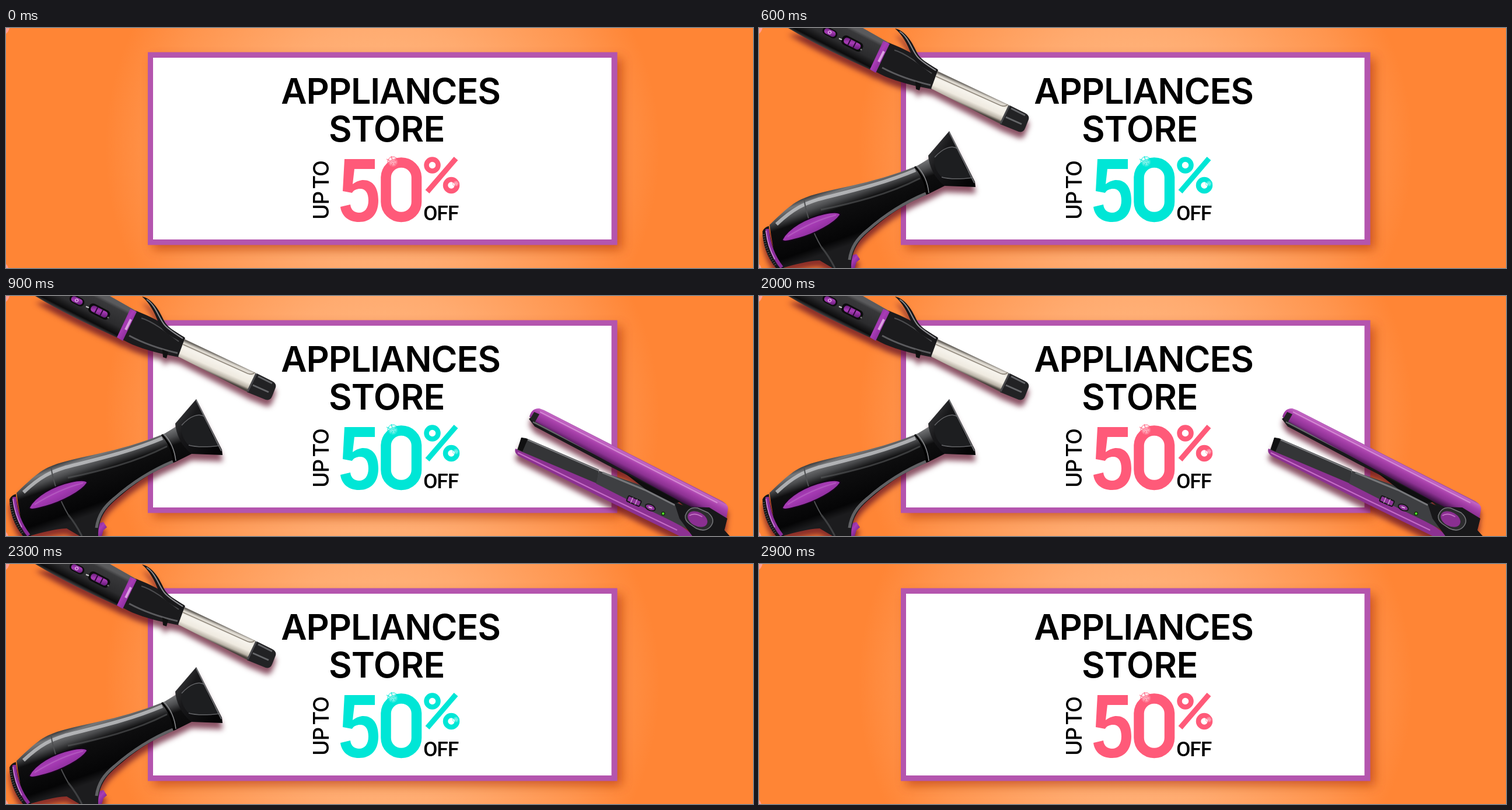
Write an HTML page that moves like this. It is 1280 by 412 pixels and loops after 3200 ms.

```html
<!DOCTYPE html>
<html lang="en">
<head>
<meta charset="utf-8">
<title>Appliances store</title>
<style>
html, body { margin: 0; width: 100%; height: 100%; overflow: hidden; background: #ff8535; }
svg { display: block; width: 100vw; height: 100vh; }
.title { font: 600 61px Inter, sans-serif; text-anchor: middle; }
.upto { font: 500 36.5px Inter, sans-serif; letter-spacing: -1.2px; word-spacing: -4px; }
.off { font: 500 35.5px Roboto, sans-serif; letter-spacing: -1.2px; }
.tool { opacity: 0; filter: drop-shadow(0 11px 5px rgba(90, 10, 35, .7)); }
.tool, .deal { animation: 3.2s step-end infinite; }
.iron { animation-name: iron; }
.dryer { animation-name: dryer; }
.straightener { animation-name: straightener; }
.trimmer { animation-name: trimmer; }
.deal { color: #ff5a79; animation-name: deal; }
@keyframes iron { 0%, 90.625%, 100% { opacity: 0 } 9.375% { opacity: 1 } }
@keyframes dryer { 0%, 81.25%, 100% { opacity: 0 } 18.75% { opacity: 1 } }
@keyframes straightener { 0%, 71.875%, 100% { opacity: 0 } 28.125% { opacity: 1 } }
@keyframes trimmer { 0%, 62.5%, 100% { opacity: 0 } 37.5% { opacity: 1 } }
@keyframes deal {
  0%, 37.5%, 90.625%, 100% { color: #ff5a79 }
  18.75%, 71.875% { color: #00e6d6 }
}
</style>
</head>
<body>
<svg viewBox="0 0 1280 412" preserveAspectRatio="none">
  <defs>
    <radialGradient id="glow" gradientUnits="userSpaceOnUse" cx="645" cy="206" r="475">
      <stop offset="0" stop-color="#ffc08c"/>
      <stop offset=".45" stop-color="#ffab70"/>
      <stop offset=".8" stop-color="#ff954e"/>
      <stop offset="1" stop-color="#ff8535"/>
    </radialGradient>
    <filter id="soft" x="-10%" y="-10%" width="120%" height="130%"><feGaussianBlur stdDeviation="9"/></filter>
    <radialGradient id="flare">
      <stop offset="0" stop-color="#fff"/>
      <stop offset=".3" stop-color="#fff" stop-opacity=".6"/>
      <stop offset="1" stop-color="#fff" stop-opacity="0"/>
    </radialGradient>
    <linearGradient id="grip" gradientUnits="userSpaceOnUse" x1="160" y1="0" x2="134" y2="51">
      <stop offset="0" stop-color="#5a5a5c"/>
      <stop offset=".1" stop-color="#38383a"/>
      <stop offset=".55" stop-color="#2b2b2d"/>
      <stop offset=".8" stop-color="#0b0b0c"/>
      <stop offset=".92" stop-color="#48484a"/>
      <stop offset="1" stop-color="#111"/>
    </linearGradient>
    <linearGradient id="barrel" gradientUnits="userSpaceOnUse" x1="367" y1="103" x2="353" y2="135">
      <stop offset="0" stop-color="#6d6963"/>
      <stop offset=".12" stop-color="#d9d4cb"/>
      <stop offset=".32" stop-color="#f6f3ec"/>
      <stop offset=".65" stop-color="#efeae0"/>
      <stop offset=".88" stop-color="#b9b2a6"/>
      <stop offset="1" stop-color="#4b453f"/>
    </linearGradient>
    <linearGradient id="violet" x1="0" y1="0" x2="1" y2="1">
      <stop offset="0" stop-color="#641a76"/>
      <stop offset=".45" stop-color="#a83cb6"/>
      <stop offset="1" stop-color="#5d1670"/>
    </linearGradient>
    <linearGradient id="shell" gradientUnits="userSpaceOnUse" x1="150" y1="266" x2="184" y2="362">
      <stop offset="0" stop-color="#3a3b3d"/>
      <stop offset=".08" stop-color="#77787a"/>
      <stop offset=".22" stop-color="#4b4c4e"/>
      <stop offset=".36" stop-color="#0e0e0f"/>
      <stop offset=".85" stop-color="#050506"/>
      <stop offset="1" stop-color="#1c1c1e"/>
    </linearGradient>
    <linearGradient id="nozzle" x1="0" y1="0" x2="1" y2=".7">
      <stop offset="0" stop-color="#48494b"/>
      <stop offset=".4" stop-color="#18181a"/>
      <stop offset="1" stop-color="#050506"/>
    </linearGradient>
    <linearGradient id="arm" gradientUnits="userSpaceOnUse" x1="1076" y1="271" x2="1060" y2="302">
      <stop offset="0" stop-color="#64206c"/>
      <stop offset=".15" stop-color="#c366c4"/>
      <stop offset=".4" stop-color="#a941ac"/>
      <stop offset=".7" stop-color="#8c3192"/>
      <stop offset="1" stop-color="#3f1246"/>
    </linearGradient>
    <linearGradient id="chrome" gradientUnits="userSpaceOnUse" x1="1073" y1="46" x2="1157" y2="104">
      <stop offset="0" stop-color="#0c0c0d"/>
      <stop offset=".08" stop-color="#747577"/>
      <stop offset=".15" stop-color="#121213"/>
      <stop offset=".3" stop-color="#2e2f30"/>
      <stop offset=".58" stop-color="#4e4f51"/>
      <stop offset=".67" stop-color="#d0d1d2"/>
      <stop offset=".74" stop-color="#1d1d1e"/>
      <stop offset=".84" stop-color="#a5a6a8"/>
      <stop offset=".92" stop-color="#4a4b4c"/>
      <stop offset="1" stop-color="#0c0c0d"/>
    </linearGradient>
    <linearGradient id="frame" gradientUnits="userSpaceOnUse" x1="1090" y1="50" x2="1145" y2="80">
      <stop offset="0" stop-color="#8c8d8f"/>
      <stop offset=".5" stop-color="#f1f1f2"/>
      <stop offset="1" stop-color="#a9aaac"/>
    </linearGradient>
    <g id="sparkle">
      <circle r="9" fill="url(#flare)"/>
      <path d="M-11-5 0-1 8-5 1 0 9 7 0 1-4 11-1 1ZM-3-10 1-1-1 0Z" fill="#fff" opacity=".75"/>
    </g>
  </defs>

  <rect width="1280" height="412" fill="#ff8535"/>
  <rect width="1280" height="412" fill="url(#glow)"/>
  <path d="M0 0H6Q4 7 0 10Z" fill="#ff9d91"/>
  <path d="M0 405Q3 408 4 412H0Z" fill="#ff9d91"/>

  <rect x="252" y="52" width="803" height="328" fill="#b83c0c" opacity=".7" filter="url(#soft)"/>
  <rect x="243" y="41.500" width="804.500" height="331" fill="#b455ae"/>
  <rect x="252" y="51" width="785.500" height="312" fill="#fff"/>

  <text class="title" x="659" y="130" letter-spacing="-1.1">APPLIANCES</text>
  <text class="title" x="652.500" y="195" letter-spacing="-.4">STORE</text>
  <text class="upto" transform="translate(553 329) rotate(-90)">UP TO</text>
  <text class="off" x="715" y="330">OFF</text>

  <g class="deal" role="img" aria-label="50%" fill="none" stroke="currentColor">
    <path fill="currentColor" stroke="none" d="M580 225H632V242H597L594 268C601 263 607 261 612 261 629 261 638 274 638 296 638 320 625 333 605 333 587 333 575 323 573 307L590 303C591 312 597 317 605 317 615 317 621 309 621 296 621 283 616 276 607 276 601 276 596 278 593 283L577 280Z"/>
    <rect x="651" y="231" width="52.500" height="93.500" rx="26" stroke-width="17.500"/>
    <g stroke-width="8.500">
      <circle cx="730.500" cy="235.500" r="10"/>
      <circle cx="763" cy="270" r="10"/>
      <path d="M771 224 722 281" stroke-width="9"/>
    </g>
    <use href="#sparkle" x="663" y="230"/>
    <use href="#sparkle" transform="translate(771 267) scale(.6)"/>
  </g>

  <g class="tool iron">
    <path d="M50 0H178L222 25 196 74C145 51 95 27 50 0Z" fill="url(#grip)"/>
    <g transform="rotate(27 122 8)">
      <rect x="108" y="1" width="27" height="14" rx="7" fill="#0c0c0d"/>
      <rect x="111" y="3" width="21" height="10" rx="5" fill="url(#violet)"/>
      <circle cx="121" cy="8" r="2.500" fill="none" stroke="#eed5f2"/>
    </g>
    <g transform="rotate(27 159 27)">
      <rect x="140" y="18" width="39" height="17" rx="7" fill="#0c0c0d"/>
      <rect x="144" y="21" width="31" height="11" rx="5" fill="url(#violet)"/>
      <path d="M154 21V32M164 21V32" stroke="#2d0938" stroke-width="2"/>
    </g>
    <path d="M137 18 142 20" stroke="#ccc" stroke-width="2"/>
    <circle cx="175" cy="37" r="1.500" fill="#777"/>
    <path d="M222 25 241 33C262 42 283 57 307 72L296 105 271 100C245 94 221 87 200 75Z" fill="#1b1b1d"/>
    <path d="M211 68C237 82 264 91 294 98" fill="none" stroke="#5b5b5e" stroke-width="3"/>
    <path d="M232 38C250 43 274 61 296 78" fill="none" stroke="#4c4c4f" stroke-width="2"/>
    <path d="M268 92 278 96 275 107 269 105Z" fill="#111"/>
    <path d="M233 1C250 4 262 23 270 41 277 55 290 61 306 71L303 80C284 70 267 62 261 45 254 27 246 12 233 1Z" fill="#18181a"/>
    <path d="M241 6C257 16 262 39 272 50 279 58 292 66 303 73" fill="none" stroke="#8c8c90" stroke-width="2"/>
    <path d="M213 22 224 27 200 77 190 71Z" fill="url(#violet)"/>
    <path d="M214 40 205 58" stroke="#dba0e0" stroke-width="4"/>
    <path d="M306 74 428 132 414 165 295 104Z" fill="url(#barrel)"/>
    <path d="M303 83 414 133Q423 136 426 131" fill="none" stroke="#8e867a" stroke-width="1.500"/>
    <path d="M430 133 456 146Q464 150 462 157L456 172Q453 180 445 178L413 165Z" fill="#222224"/>
    <path d="M432 138 456 150M423 153 450 165" stroke="#66676a" stroke-width="3"/>
    <path d="M429 133 414 164" stroke="#47474a" stroke-width="3"/>
  </g>

  <g class="tool dryer">
    <path d="M156 391 167 388 173 397 167 402 164 412H152Z" fill="url(#violet)"/>
    <path d="M18 338C45 312 60 298 80 291 120 275 190 270 272 236L300 219 320 270 290 285C247 302 217 325 190 348 170 365 158 382 158 412H126L104 399C82 400 62 406 40 412H30Z" fill="url(#shell)"/>
    <path d="M30 337C60 309 77 302 102 294 157 280 214 267 268 244" fill="none" stroke="#c4c5c7" stroke-width="6" opacity=".8"/>
    <path d="M106 312C160 301 221 286 276 258" fill="none" stroke="#58595b" stroke-width="3" opacity=".6"/>
    <path d="M286 284C243 302 212 324 186 347 168 362 158 376 155 398" fill="none" stroke="#606164" stroke-width="5"/>
    <path d="M107 376C116 387 123 398 130 412" fill="none" stroke="#3f4042" stroke-width="3"/>
    <path d="M77 293C81 320 92 351 107 376" fill="none" stroke="#4e4f51" stroke-width="2"/>
    <path d="M267 238C279 251 286 267 288 285" fill="none" stroke="#000" stroke-width="3"/>
    <path d="M271 237C283 250 289 265 291 283" fill="none" stroke="#8c8d8f" stroke-width="1.500"/>
    <path d="M326 177 370 264 371 273 318 271C300 257 291 236 290 219Z" fill="url(#nozzle)"/>
    <path d="M301 222C316 205 331 201 340 207 346 225 352 241 365 256 344 259 322 259 313 256 304 247 299 235 301 222Z" fill="#1d1e20"/>
    <path d="M301 222C316 205 331 201 340 207M313 256C327 260 349 259 366 257" fill="none" stroke="#636467" stroke-width="1.500"/>
    <path d="M326 179 369 266" stroke="#6a6b6e" stroke-width="2"/>
    <path d="M40 363C50 344 80 326 112 319 131 315 140 317 139 321 129 336 96 353 68 361 50 366 40 368 40 363Z" fill="url(#violet)" stroke="#16051b" stroke-width="2"/>
    <path d="M49 358C76 341 105 328 132 321" fill="none" stroke="#b865c3" stroke-width="2" opacity=".7"/>
    <path d="M6 349Q9 342 17 340C18 365 27 391 43 412H29C14 394 6 370 6 349Z" fill="#161618"/>
    <path d="M14 345C16 369 23 391 39 411" fill="none" stroke="#8b2c9b" stroke-width="6"/>
    <path d="M12 348C14 367 20 384 27 397" fill="none" stroke="#c47bcd" stroke-width="2"/>
    <path d="M8 354C10 374 18 393 29 408" fill="none" stroke="#58595b" stroke-width="4" stroke-dasharray="1 3"/>
  </g>

  <g class="tool straightener">
    <path d="M896 211 906 224 1030 290 1150 351 1173 370 1200 366 1036 276 905 204Z" fill="#19191b"/>
    <path d="M903 216 1035 284 1149 346" fill="none" stroke="#66676a" stroke-width="3"/>
    <path d="M897 207Q901 192 914 193L922 196 1225 351Q1239 358 1237 367L1234 384 1206 377 1160 355 1030 284 902 213Z" fill="url(#arm)"/>
    <path d="M915 199 1219 355" stroke="#dd9adc" stroke-width="2" opacity=".75"/>
    <path d="M898 211 905 199 914 203 906 217Z" fill="#222224"/>
    <path d="M873 262Q870 269 879 275L1040 356 1154 412H1180L1145 386 1060 346 1012 321Z" fill="#8c3192"/>
    <path d="M877 269 1040 349 1150 402" fill="none" stroke="#c46cc5" stroke-width="2"/>
    <path d="M883 243 891 244 1016 298 1013 322 876 264Z" fill="#343537"/>
    <path d="M883 243 877 263 885 267 894 246Z" fill="#101011"/>
    <path d="M894 247 1016 300" stroke="#7c7d80" stroke-width="2"/>
    <path d="M1016 300 1100 329 1150 353 1178 379 1176 405 1142 387 1060 347 1011 322Z" fill="#3e3f42"/>
    <path d="M1022 303 1095 333 1146 359" fill="none" stroke="#77787b" stroke-width="3"/>
    <path d="M1060 304 1100 324 1155 353 1146 357 1095 331Z" fill="#0e0e0f"/>
    <path d="M1145 354 1168 362 1205 363 1236 382 1231 402 1240 412H1176L1154 382Z" fill="#171719"/>
    <path d="M1164 377Q1170 361 1185 364L1203 372Q1217 384 1207 396 1198 406 1183 399L1171 391Q1163 385 1164 377Z" fill="#2c2c2e" stroke="#76777a" stroke-width="1.500"/>
    <ellipse cx="1185" cy="383" rx="18" ry="12" transform="rotate(28 1185 383)" fill="#8a2f91"/>
    <path d="M1171 377Q1180 371 1193 379" fill="none" stroke="#c072c3" stroke-width="2"/>
    <g transform="rotate(24 1076 352)">
      <rect x="1064" y="347" width="24" height="10" rx="2" fill="#8f3599" stroke="#171719" stroke-width="2"/>
      <path d="M1072 347V357M1080 347V357" stroke="#e2bae5"/>
    </g>
    <ellipse cx="1104" cy="363" rx="9" ry="5" transform="rotate(24 1104 363)" fill="#8f3599" stroke="#171719" stroke-width="2"/>
    <path d="M1101 362 1107 364" stroke="#eed5f2" stroke-width="1.500"/>
    <circle cx="1126" cy="373.500" r="3.500" fill="#17320f"/>
    <circle cx="1126" cy="373.500" r="2" fill="#51ef28"/>
  </g>

  <g class="tool trimmer">
    <path d="M1109 0H1209C1190 38 1164 78 1139 113L1086 178Q1076 191 1066 187L1062 165 1017 124 1026 104C1048 72 1079 31 1109 0Z" fill="url(#chrome)"/>
    <path d="M1020 112Q1040 88 1050 96 1062 114 1090 123 1091 133 1084 149L1074 169 1012 131Z" fill="#0b0b0c"/>
    <path d="M1027 108C1049 108 1074 122 1086 143" fill="none" stroke="#5d5e61" stroke-width="3"/>
    <path d="M1049 92C1061 111 1078 120 1100 123" fill="none" stroke="#a5a6a8" stroke-width="2"/>
    <path d="M1021 119C1041 122 1060 134 1075 153" fill="none" stroke="#2f3032" stroke-width="6"/>
    <path d="M1006 143 1068 181" stroke="#151516" stroke-width="26" stroke-dasharray="5.500 2.500"/>
    <path d="M1003 148 1065 186" stroke="#c3c4c6" stroke-width="15" stroke-dasharray="2 6"/>
    <path d="M1012 133 1074 170" stroke="#0b0b0c" stroke-width="6"/>
    <path d="M1139 1Q1143-3 1150 0H1178C1169 26 1147 63 1118 100Q1112 106 1105 103L1078 88Q1072 83 1077 76Z" fill="url(#frame)" stroke="#303132"/>
    <path d="M1132 18Q1136 13 1142 16L1154 23Q1159 27 1155 33L1114 91Q1110 96 1105 93L1089 84Q1084 81 1088 75Z" fill="#a84aaa" stroke="#4f1a55" stroke-width="1.500"/>
    <circle cx="1115" cy="61" r="10" fill="#161617"/>
    <circle cx="1113" cy="59" r="5" fill="#39393b"/>
    <circle cx="1134" cy="38" r="3.500" fill="#17320f"/>
    <circle cx="1134" cy="38" r="2" fill="#51ef28"/>
  </g>
</svg>
</body>
</html>
```
